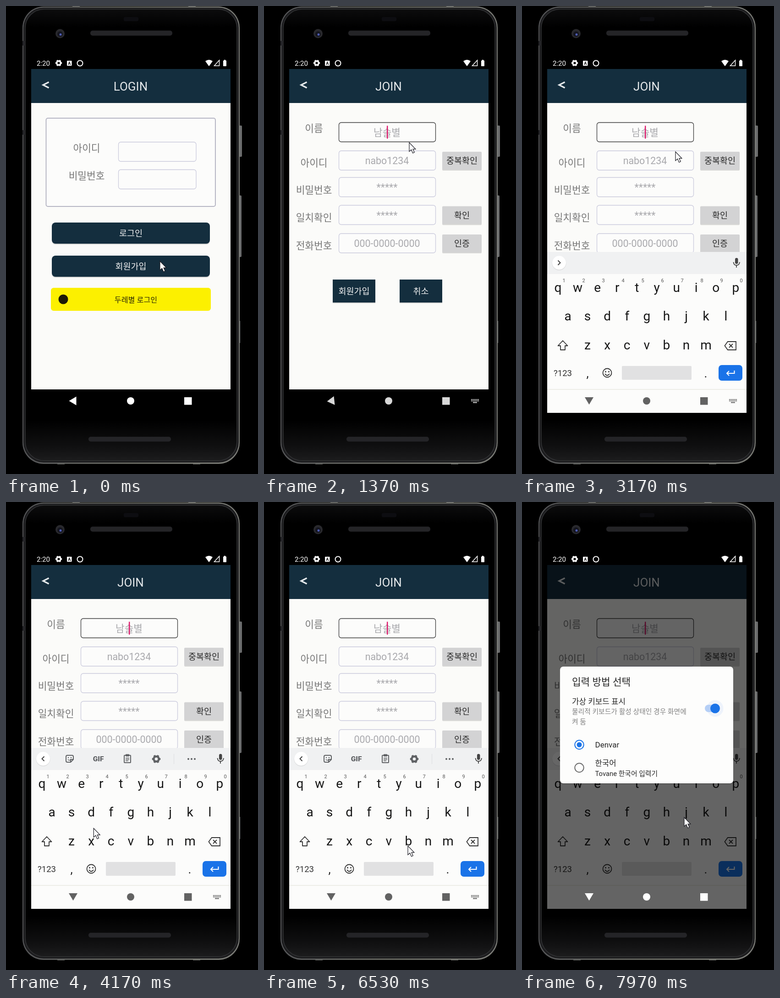
An HTML page for the animation above (8000 ms loop, 550 by 1018 pixels).

```html
<!DOCTYPE html>
<html lang="ko">
<head>
<meta charset="utf-8">
<title>Join screen</title>
<style>
  html, body { margin: 0; width: 100%; height: 100%; overflow: hidden; background: #000; }
  svg { display: block; width: 100vw; height: 100vh; }
  text { font-family: Roboto, "Noto Sans CJK KR", "Noto Sans CJK JP", "Noto Sans CJK", sans-serif; }
</style>
</head>
<body>
<svg id="stage" viewBox="0 0 550 1018"></svg>
<script>
const NAVY = '#142e3e', PAPER = '#fbfbf9', BLUE = '#1a73e8', GRAY = '#5f6164';

const rect = (x, y, w, h, fill, r = 0, more = '') =>
  `<rect x="${x}" y="${y}" width="${w}" height="${h}" rx="${r}" fill="${fill}" ${more}/>`;
const circle = (x, y, r, fill, more = '') => `<circle cx="${x}" cy="${y}" r="${r}" fill="${fill}" ${more}/>`;
const line = (d, stroke, width = 2, more = '') =>
  `<path d="${d}" fill="none" stroke="${stroke}" stroke-width="${width}" ${more}/>`;
const shape = (d, fill, more = '') => `<path d="${d}" fill="${fill}" ${more}/>`;
const text = (s, x, y, size, fill, anchor = 'middle', weight = 400) =>
  `<text x="${x}" y="${y}" font-size="${size}" fill="${fill}" text-anchor="${anchor}" font-weight="${weight}">${s}</text>`;
const group = (id, body, more = '') => `<g id="${id}" ${more}>${body}</g>`;

const gear = (x, y, r, fill) =>
  circle(x, y, r * .62, 'none', `stroke="${fill}" stroke-width="${r * .5}"`) +
  circle(x, y, r * .88, 'none',
    `stroke="${fill}" stroke-width="${r * .3}" pathLength="12" stroke-dasharray="1" stroke-dashoffset=".5"`);

function phone() {
  return rect(508, 260, 7, 68, '#6c6d6e', 2) + rect(508, 412, 6, 134, '#6c6d6e', 2) + rect(508, 685, 3.5, 48, '#505153') +
    [[145, 0], [398, 0], [112, 994], [408, 994]].map(([x, y]) => rect(x, y, 16, 3, '#6a6b68')).join('') +
    rect(36, 1, 474, 995, 'url(#rim)', 46) +
    rect(38, 3.5, 470, 989.5, '#1c1c1e', 44) +
    rect(42, 7, 462, 982, 'url(#glass)', 41, 'stroke="#323335" stroke-width="1.500"') +
    [76, 270].map(y => rect(36, y, 6, 10, '#242427')).join('') +
    rect(257, 24, 32, 9, '#0d0d11', 3) +
    circle(118, 60, 10, '#29292d') + circle(118, 61, 6, '#14151f') + circle(119, 62, 2.5, '#4d5bb0') +
    rect(184, 53.5, 179, 11, '#242427', 5) + rect(180, 937, 180, 10.5, '#242427', 5);
}

function statusBar() {
  return text('2:20', 67, 130, 15, '#fff', 'start') + gear(115, 124, 7, '#fff') +
    rect(133, 119, 10.5, 11, '#fff', 1) + text('A', 138.2, 128, 9, '#000', 'middle', 700) +
    circle(161.5, 124.5, 6, 'none', 'stroke="#fff" stroke-width="2"') +
    shape('M435 120Q443 114 451 120L443 131Z', '#fff') +
    line('M465.5 118V130H454.5Z', '#fff', 1.5) +
    rect(474, 118.5, 7, 12.5, '#fff', 1) + rect(476, 117, 3, 3, '#fff');
}

const header = title => rect(55, 137, 435, 698, PAPER) + rect(55, 137, 435, 74, NAVY) +
  line('M93.500 165.500L81 171.700L93.500 178', '#e4e8ea', 3.2) + text(title, 272, 184, 26, '#e4e8ea');
const label = (s, x, y) => text(s, x, y, 21.4, '#777');
const field = (x, y, w, stroke = '#cbcbdd') => rect(x, y, w, 42, '#fcfcfb', 5, `stroke="${stroke}" stroke-width="1.300"`);
const button = (s, x, y, w, h, fill, color, r = 0) =>
  rect(x, y + 2, w, h, '#000', r, 'opacity=".14"') + rect(x, y, w, h, fill, r) +
  text(s, x + w / 2, y + h / 2 + 6.7, 18.5, color);

function loginPage() {
  return header('LOGIN') +
    rect(87.5, 244, 369.5, 192, '#fcfcfb', 4, 'stroke="#b6b6c4" stroke-width="2"') +
    label('아이디', 176, 317) + field(245.5, 296, 169.5) +
    label('비밀번호', 176, 377) + field(245.5, 356, 169.5) +
    button('로그인', 100, 471, 345, 46, NAVY, '#f4f4f4', 8) +
    button('회원가입', 100, 543, 345, 46, NAVY, '#f4f4f4', 8) +
    rect(98, 613, 349, 50, '#fcf000', 6) + circle(125, 638, 10.5, '#1c1a06') +
    text('두레별 로그인', 283.5, 645, 16.2, '#2b2806', 'middle', 500);
}

function joinPage() {
  const rows = [
    ['이름', 253.5, 274, '남솔별', '', '#3c3c3c'],
    ['아이디', 315, 349, 'nabo1234', '중복확인'],
    ['비밀번호', 373, 408, '*****', ''],
    ['일치확인', 433.5, 468, '*****', '확인'],
    ['전화번호', 495, 529, '000-0000-0000', '인증']];
  return header('JOIN') + rows.map(([name, y, base, hint, action, edge]) =>
    label(name, 109, base) + field(163.5, y, 211, edge) + text(hint, 268.5, y + 29, 21.4, '#a9a9ad') +
    (action && button(action, 389, y + 2, 86, 39, '#d3d3d4', '#2a2a2a', 2))).join('') +
    rect(268, 260.5, 2.4, 28, '#e0186c', 0, 'id="caret"') +
    button('회원가입', 150, 595, 93, 50, NAVY, '#f4f4f4') + button('취소', 296, 595, 93, 50, NAVY, '#f4f4f4');
}

function toolbar() {
  return line('M134 551H144Q147 551 147 554V560L141 566H134Q131 566 131 563V554Q131 551 134 551ZM141 566V560H147', GRAY) +
    circle(136, 556, 1.2, GRAY) + circle(142, 556, 1.2, GRAY) + line('M135 560Q138 563 140 561', GRAY, 1.5) +
    text('GIF', 201.5, 564, 15.5, GRAY, 'middle', 900) +
    rect(258, 551, 14, 16, 'none', 1, `stroke="${GRAY}" stroke-width="2"`) + rect(261, 548.5, 8, 5, GRAY, 1) +
    line('M261 557H269M261 560H269M261 563H267', GRAY, 1.3) +
    gear(328, 559, 9, GRAY) + rect(366, 548, 1, 22, '#dcdde0') +
    [398, 405, 412].map(x => circle(x, 559, 2, GRAY)).join('');
}

function keyboard() {
  const keys = (letters, x, y) =>
    [...letters].map((c, i) => text(c, x + 43.1 * i, y, 28, '#161616')).join('');
  return rect(55, 535, 435, 350, '#fcfcfb') + rect(55, 535, 435, 48, '#f0f1f2') +
    circle(81, 559.5, 15.5, '#000', 'opacity=".08"') + circle(81, 558.5, 15, '#fff') +
    line('M78.500 553.500L83.500 558.500L78.500 563.500', '#444', 2, 'id="chevron"') +
    group('toolbar', toolbar()) +
    rect(465, 548, 6.5, 13, '#444', 3.2) + line('M461.500 557Q462 564 468 564Q474.500 564 475 557M468 564V569', '#444', 1.8) +
    keys('qwertyuiop', 78.5, 622) + keys('asdfghjkl', 100, 684) + keys('zxcvbnm', 143, 746.5) +
    [...'1234567890'].map((c, i) => text(c, 91.5 + 43 * i, 601, 11, '#555')).join('') +
    line('M89 728L99.500 739H94V748H84V739H78.500Z', '#333', 1.8, 'stroke-linejoin="round"') +
    line('M449 730H467V748H449L442.500 739ZM452 735L460 743M460 735L452 743', '#333', 1.8) +
    text('?123', 89, 805, 18.5, '#333') + text(',', 143, 808, 26, '#222') + text('.', 401, 808, 26, '#222') +
    circle(186, 798, 9.5, 'none', 'stroke="#333" stroke-width="1.800"') + circle(182.5, 795.5, 1.5, '#333') +
    circle(189.5, 795.5, 1.5, '#333') + line('M181 800Q186 807 191 800', '#333', 1.8) +
    rect(218, 783, 152, 30, '#e1e1e2', 2) + rect(429, 781, 52, 34, BLUE, 7) +
    line('M463.500 793V799H447M452 794L447 799L452 804', '#fff', 2) +
    rect(55, 833.5, 435, 1, '#e2e2d6');
}

function dots() {
  let out = '';
  for (let i = 0; i < 6; i++) for (let j = 0; j < 2; j++) out += rect(452 + i * 3, 855 + j * 3, 2, 2, 'currentColor');
  return out + rect(456, 861.5, 9, 2, 'currentColor');
}
const navBar = () =>
  shape('M137.500 859L153.500 849.500V868.500Z', 'currentColor', 'id="back"') + circle(272, 859, 8, 'currentColor') +
  rect(389, 851, 16.5, 16.5, 'currentColor') + group('imeIcon', dots());

function dialog() {
  const radio = (y, color) => circle(125, y, 9.7, 'none', `stroke="${color}" stroke-width="2"`);
  return rect(83, 360, 378, 254, '#000', 7, 'opacity=".15"') + rect(83, 358, 378, 254, '#fdfdfc', 7) +
    text('입력 방법 선택', 109, 398.5, 21.3, '#252525', 'start') +
    text('가상 키보드 표시', 109, 440, 16.9, '#252525', 'start') +
    text('물리적 키보드가 활성 상태인 경우 화면에', 109, 461, 14.8, '#808080', 'start') +
    text('켜 둠', 109, 482.5, 14.8, '#808080', 'start') +
    circle(421.5, 449, 18, '#eef3fb') + rect(399, 441, 31, 16, '#b5cff6', 8) + circle(421.5, 449, 10.5, BLUE) +
    radio(528, BLUE) + circle(125, 528, 5.5, BLUE) + text('Denvar', 159.5, 534, 17, '#252525', 'start') +
    radio(578, '#6c6c6c') + text('한국어', 159.5, 574, 16.7, '#252525', 'start') +
    text('Tovane 한국어 입력기', 159.5, 595.5, 14.8, '#252525', 'start');
}

const stage = document.getElementById('stage');
stage.innerHTML = `<defs>
  <clipPath id="screen"><rect x="55" y="137" width="435" height="748"/></clipPath>
  <clipPath id="page"><rect x="55" y="137" width="435" height="697"/></clipPath>
  <linearGradient id="rim"><stop stop-color="#555658"/><stop offset=".5" stop-color="#66675f"/><stop offset="1" stop-color="#7c7d78"/></linearGradient>
  <linearGradient id="glass" x2="0" y2="1"><stop stop-color="#0c0c0d"/><stop offset=".04" stop-color="#000"/>
  <stop offset=".91" stop-color="#000"/><stop offset=".97" stop-color="#101011"/><stop offset="1" stop-color="#1c1c1d"/></linearGradient></defs>` +
  phone() + statusBar() +
  `<g clip-path="url(#page)">${group('login', loginPage()) + group('join', joinPage())}</g>` +
  `<g clip-path="url(#screen)">${group('keyboard', keyboard())}` +
  circle(460.5, 859, 21.5, '#000', 'id="ripple"') +
  rect(55, 137, 435, 748, '#000', 0, 'id="dim"') + '</g>' +
  group('nav', navBar()) + group('dialog', dialog()) +
  group('pointer', shape('M0 0V19.500L4.500 15.500L7.700 23L11.200 21.500L8 14.300H13.800Z', '#fff', 'stroke="#1c1c24" stroke-width="1.200"'));

const el = Object.fromEntries([...stage.querySelectorAll('[id]')].map(node => [node.id, node]));
const set = (id, name, value) => el[id].setAttribute(name, value);
const ramp = (t, from, to) => Math.min(1, Math.max(0, (t - from) / (to - from)));
const mix = (a, b, k) => a + (b - a) * k;
const smooth = k => k * k * (3 - 2 * k);
const easeOut = k => 1 - (1 - k) ** 3;

const pointerPath = [
  [0, 336, 555], [320, 336, 555], [1070, 317, 297], [1400, 317, 297], [2050, 335, 317], [3640, 335, 317],
  [4440, 140, 850], [4830, 112, 852], [5000, 112, 852], [5230, 119, 808], [5530, 150, 790], [5670, 150, 790],
  [6470, 314, 748], [6530, 314, 748], [7280, 466, 858], [7700, 466, 858], [7970, 354, 686], [8000, 354, 686]];
function pointerAt(t) {
  const i = pointerPath.findIndex(p => p[0] > t);
  const [a, b] = [pointerPath[i - 1], pointerPath[i]];
  const k = smooth(ramp(t, a[0], b[0]));
  return [mix(a[1], b[1], k), mix(a[2], b[2], k)];
}

const zoom = s => `translate(272.5 486) scale(${s}) translate(-272.5 -486)`;

function draw(t) {
  const enter = easeOut(ramp(t, 300, 700));
  set('login', 'transform', zoom(mix(1, 1.15, enter)));
  set('login', 'display', t < 720 ? 'inline' : 'none');
  set('join', 'transform', zoom(mix(.85, 1, enter)));
  set('join', 'opacity', ramp(t, 335, 400));

  const blink = t % 1000;
  set('caret', 'opacity', t > 7500 || (blink >= 110 && blink < 635) ? 1 : 0);

  const rise = easeOut(ramp(t, 1390, 1640));
  set('keyboard', 'transform', `translate(0 ${350 * (1 - rise)})`);
  set('keyboard', 'display', rise > 0 ? 'inline' : 'none');
  const expand = smooth(ramp(t, 3640, 3890));
  set('toolbar', 'opacity', expand);
  set('chevron', 'transform', `rotate(${180 * expand} 81 558.5)`);

  set('ripple', 'opacity', t < 7670 ? .12 * ramp(t, 7380, 7500) : 0);
  const dim = .3 * ramp(t, 7660, 7700) + .3 * ramp(t, 7700, 7790);
  set('dim', 'opacity', dim);
  set('dialog', 'opacity', .92 * ramp(t, 7655, 7700) + .08 * ramp(t, 7700, 7740));

  // Navigation icons darken on the light bar and turn white over the dimmed one.
  const darken = ramp(t, 1500, 1650), whiten = ramp(t, 7780, 7900);
  const tone = Math.round(mix(mix(t < 1300 ? 255 : 216, 98, darken), 255, whiten));
  set('nav', 'color', `rgb(${tone},${tone},${tone})`);
  set('back', 'transform', `rotate(${-90 * smooth(ramp(t, 1335, 1560))} 146 858.5)`);
  set('imeIcon', 'display', t > 1300 && t < 7680 ? 'inline' : 'none');

  set('pointer', 'transform', `translate(${pointerAt(t).join(' ')})`);
}

function tick() {
  draw(performance.now() % 8000);
  requestAnimationFrame(tick);
}
tick();
</script>
</body>
</html>
```
